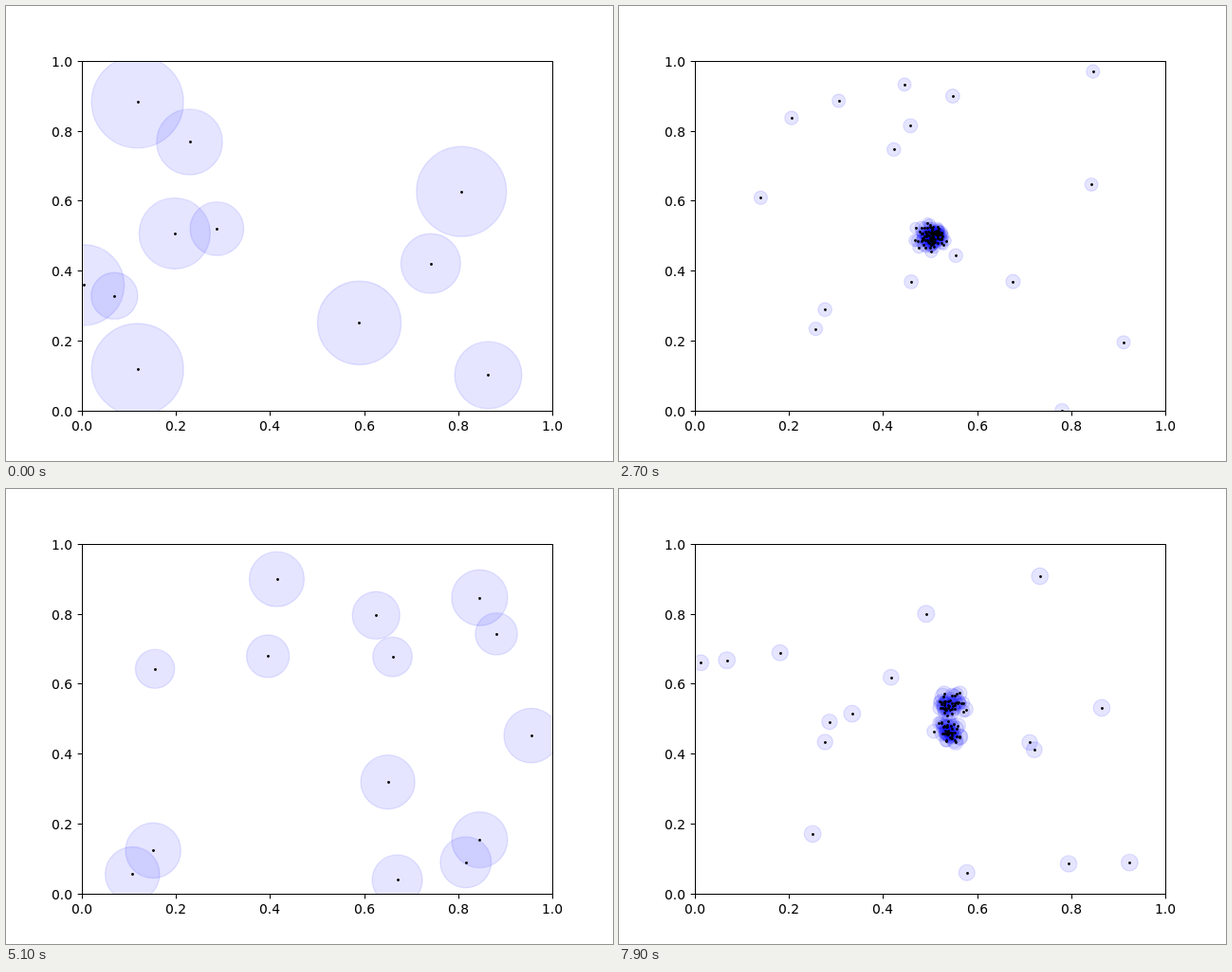
Write an HTML page with a canvas that moves like this. It is 640 by 480 pixels and loops after 8 s.

```html
<!DOCTYPE html>
<html>
<head>
<meta charset="utf-8">
<style>
html, body { margin: 0; width: 100%; height: 100%; overflow: hidden; background: #fff; }
canvas { display: block; }
</style>
</head>
<body>
<canvas id="stage" width="640" height="480"></canvas>
<script>
const ctx = document.getElementById('stage').getContext('2d');
const STEP = 100, STEPS = 80;
const px = v => 80 + 496 * v;
const py = v => 427.2 - 369.6 * v;

// step, largest radius, particles per cluster
const phases = [[0, 48.5, 0], [15, 10, 42], [27, 7.5, 45], [37, 13, 38],
  [51, 29.5, 0], [62, 9.5, 40], [79, 9, 40]];

function seeded(seed) {
  let a = seed * 7919 + 12345;
  return () => {
    a = a + 0x6D2B79F5 | 0;
    let t = Math.imul(a ^ a >>> 15, a | 1);
    t ^= t + Math.imul(t ^ t >>> 7, t | 61);
    return ((t ^ t >>> 14) >>> 0) / 4294967296;
  };
}

function phaseAt(step) {
  const i = Math.max(1, phases.findIndex(p => p[0] >= step));
  const [s0, r0, n0] = phases[i - 1], [s1, r1, n1] = phases[i];
  const k = (step - s0) / (s1 - s0);
  return { radius: r0 * (r1 / r0) ** k, count: Math.round(n0 + (n1 - n0) * k) };
}

// Explorers land anywhere; radii vary more while they are large
function explorers(step, radius) {
  const rnd = seeded(step + 200);
  return Array.from({ length: Math.round(17 - radius / 6) }, () => ({
    x: px(rnd()),
    y: py(rnd()),
    r: radius * (1 - radius / 95 * rnd())
  }));
}

// Two swarms follow peaks sliding along the diagonals, each with one large leader
function swarms(step, radius, count) {
  const rnd = seeded(step);
  const gauss = () => (rnd() + rnd() + rnd() - 1.5) * 2;
  const peak = 0.904 - 0.0147 * Math.abs(step - 54.25);
  const lead = 0.015 + 0.97 * peak;
  const swarm = (cy, ly) => [
    { x: px(lead), y: py(ly), r: radius },
    ...Array.from({ length: count }, () => ({
      x: px(peak) + 7.5 * gauss(),
      y: py(cy) + 5.5 * gauss(),
      r: radius * (0.6 + 0.35 * rnd())
    }))
  ];
  return [...swarm(peak, lead), ...swarm(1 - peak, 1 - lead)];
}

function disc(x, y, r) {
  ctx.beginPath();
  ctx.arc(x, y, r, 0, 2 * Math.PI);
  ctx.fill();
}

function drawAxes() {
  ctx.fillStyle = '#000';
  ctx.font = '13.89px "DejaVu Sans", sans-serif';
  for (let i = 0; i <= 5; i++) {
    const x = Math.round(px(i / 5)), y = Math.round(py(i / 5));
    const label = (i / 5).toFixed(1);
    ctx.fillRect(x, 428, 1, 4.36);
    ctx.fillRect(75.64, y, 4.36, 1);
    ctx.fillText(label, x - 11, 448);
    ctx.fillText(label, 48, y + 6);
  }
  ctx.lineWidth = 1;
  ctx.strokeStyle = '#000';
  ctx.strokeRect(80.5, 58.5, 496, 369);
}

function draw(step) {
  const { radius, count } = phaseAt(step);
  const points = [...explorers(step, radius), ...swarms(step, radius, count)];
  ctx.fillStyle = '#fff';
  ctx.fillRect(0, 0, 640, 480);
  ctx.save();
  ctx.beginPath();
  ctx.rect(80, 58, 496, 369);
  ctx.clip();
  ctx.fillStyle = ctx.strokeStyle = 'rgba(0, 0, 255, 0.1)';
  ctx.lineWidth = 1.39;
  for (const p of points) {
    disc(p.x, p.y, p.r);
    ctx.stroke();
  }
  ctx.fillStyle = '#000';
  for (const p of points) disc(Math.round(p.x) + 0.5, Math.round(p.y) + 0.5, 1.4);
  ctx.restore();
  drawAxes();
}

let shown = -1;
function tick() {
  const step = Math.floor(performance.now() / STEP) % STEPS;
  if (step !== shown) draw(shown = step);
  requestAnimationFrame(tick);
}
tick();
</script>
</body>
</html>
```
